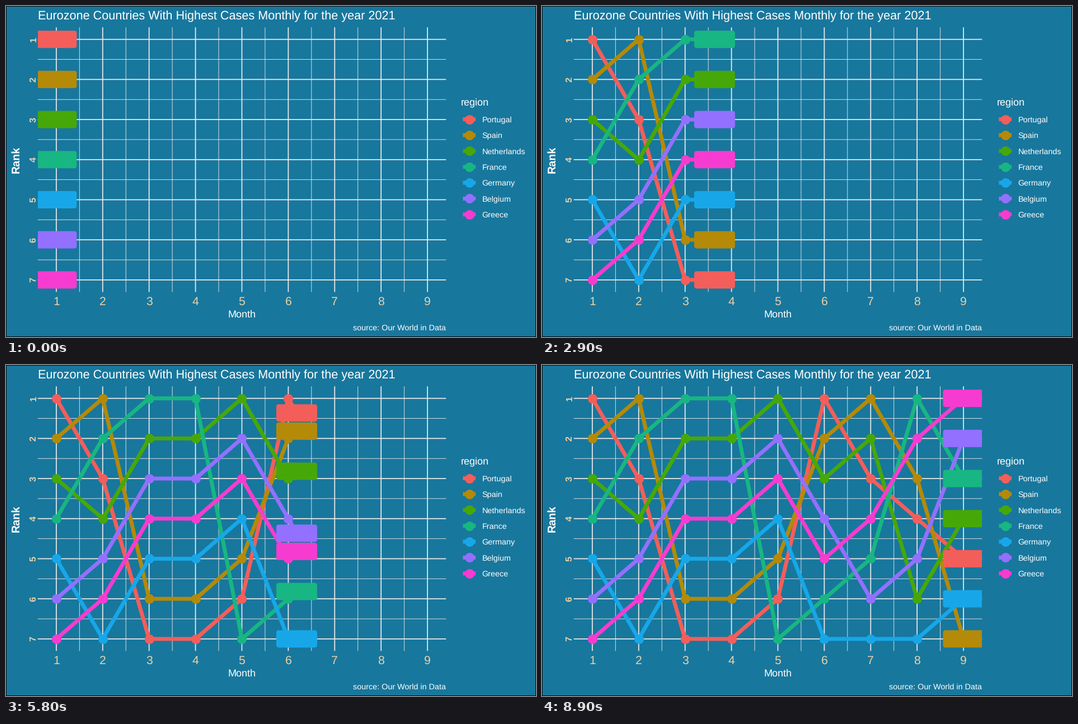
Recreate the animation shown at these times as a matplotlib script. Size 947x592 px, loop 10 s.

```python
import numpy as np
import matplotlib.pyplot as plt
from matplotlib.animation import FuncAnimation
from matplotlib.patches import FancyBboxPatch, Rectangle

W, H, DPI = 947, 592, 64
LEFT, RIGHT, TOP, BOTTOM = 56.7, 786.25, 38.15, 511.4
BG, GRID, TICK = "#18779d", "#ebebeb", "#e8d3a8"
BOX_W, BOX_H = 73, 31
DOT = 17

# Region: colour and rank in each month
REGIONS = {
    "Portugal": ("#f35e5a", [1, 3, 7, 7, 6, 1, 3, 4, 5]),
    "Spain": ("#b48a08", [2, 1, 6, 6, 5, 2, 1, 3, 7]),
    "Netherlands": ("#46a808", [3, 4, 2, 2, 1, 3, 2, 6, 4]),
    "France": ("#18b682", [4, 2, 1, 1, 7, 6, 5, 1, 3]),
    "Germany": ("#17a7e9", [5, 7, 5, 5, 4, 7, 7, 7, 6]),
    "Belgium": ("#9370ff", [6, 5, 3, 3, 2, 4, 6, 5, 2]),
    "Greece": ("#f63cd0", [7, 6, 4, 4, 3, 5, 4, 2, 1]),
}
MONTHS = np.arange(1, 10)
# Steps from month to month; the middle stretch takes one more
STOPS = np.cumsum([0, 11, 11, 11, 11, 12, 11, 11, 11])

plt.rcParams["font.family"] = "Liberation Sans"
plt.rcParams["text.hinting"] = "no_hinting"


def pt(px):
    return px * 72 / DPI


def px_x(month):
    return LEFT + (np.asarray(month) - 0.6) * (RIGHT - LEFT) / 8.8


def px_y(rank):
    return TOP + (np.asarray(rank) - 0.7) * (BOTTOM - TOP) / 6.6


fig = plt.figure(figsize=(W / DPI, H / DPI), dpi=DPI, facecolor=BG)
ax = fig.add_axes([0, 0, 1, 1])
ax.set_xlim(0, W)
ax.set_ylim(H, 0)
ax.axis("off")
panel = Rectangle((LEFT, TOP), RIGHT - LEFT, BOTTOM - TOP,
                  transform=ax.transData)


def text(x, y, s, size, color="white", **kw):
    ax.text(x, y, s, fontsize=pt(size), color=color, va="baseline",
            rotation_mode="anchor", **kw)


def line(xs, ys, color, width, z):
    return ax.plot(xs, ys, color=color, lw=pt(width), zorder=z, snap=False,
                   solid_capstyle="butt", solid_joinstyle="round")[0]


def dots(xs, ys, color):
    return ax.scatter(xs, ys, s=pt(DOT) ** 2, color=color, linewidths=0,
                      zorder=3, snap=False)


def draw_grid():
    for step, width in ((0.5, 0.9), (0, 1.75)):
        for m in np.arange(1 + step, 9.1):
            line([px_x(m)] * 2, [TOP, BOTTOM], GRID, width, 1)
        for r in np.arange(1 + step, 7.1):
            line([LEFT, RIGHT], [px_y(r)] * 2, GRID, width, 1)


def draw_labels():
    text(LEFT, 24.6, "Eurozone Countries With Highest Cases Monthly "
         "for the year 2021", 21.65)
    for m in MONTHS:
        text(px_x(m), 534.8, str(m), 21.3, TICK, ha="center")
    for r in range(1, 8):
        text(53.5, px_y(r), str(r), 16.4, TICK, ha="center",
             rotation=90, weight="bold")
    text((LEFT + RIGHT) / 2, 556.7, "Month", 18.05, ha="center")
    text(23.1, (TOP + BOTTOM) / 2, "Rank", 19.7, ha="center",
         rotation=90, weight="bold")
    text(RIGHT, 579.9, "source: Our World in Data", 14.44, ha="right")


def draw_legend():
    text(813, 177.4, "region", 18.05)
    for i, (name, (color, _)) in enumerate(REGIONS.items()):
        y = 202.6 + 28.36 * i
        line([816.4, 839.1], [y, y], color, 7, 2)
        dots([827.7], [y], color)
        text(850.7, y + 5.2, name, 14.44)


draw_grid()
draw_labels()
draw_legend()
ax.add_patch(Rectangle((0, 0), W, H, fill=False, ec="black", lw=pt(1.9),
                       zorder=9, clip_on=False))

tracks = []
for color, ranks in REGIONS.values():
    trail = line([], [], color, 7, 2)
    marks = dots([], [], color)
    box = FancyBboxPatch((0, 0), BOX_W, BOX_H, fc=color, ec="none", zorder=4,
                         boxstyle="round,pad=0,rounding_size=4.5")
    ax.add_patch(box)
    for part in (trail, marks, box):
        part.set_clip_path(panel)
    tracks.append((np.array(ranks), trail, marks, box))


def update(i):
    now = np.interp(i, STOPS, MONTHS)
    past = MONTHS[MONTHS <= now]
    for ranks, trail, marks, box in tracks:
        rank = np.interp(now, MONTHS, ranks)
        done = ranks[:len(past)]
        trail.set_data(px_x(np.append(past, now)), px_y(np.append(done, rank)))
        marks.set_offsets(np.column_stack([px_x(past), px_y(done)]))
        box.set_x(px_x(now) - BOX_W / 2)
        box.set_y(px_y(rank) - BOX_H / 2)
    return [part for track in tracks for part in track[1:]]


anim = FuncAnimation(fig, update, frames=100, interval=100, repeat=True,
                     repeat_delay=0, blit=False)
plt.show()
```
